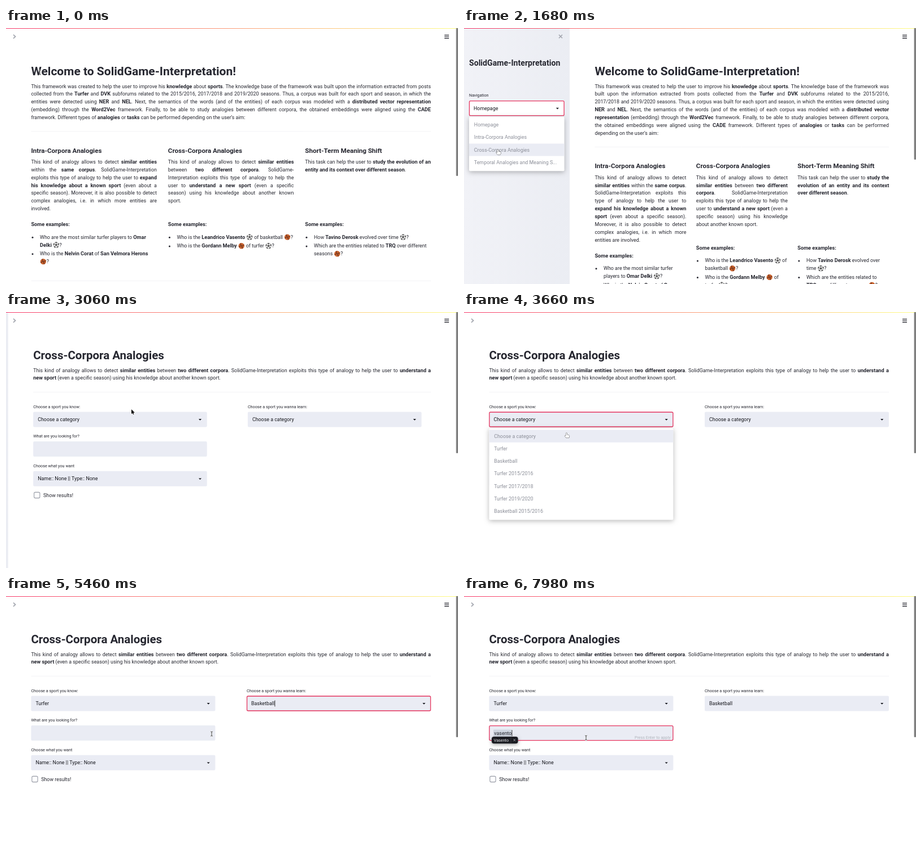
Recreate the animation shown at these times as an HTML page with a canvas. Size 800 by 455 pixels, loop 8000 ms.

```html
<!DOCTYPE html>
<html lang="en">
<head>
<meta charset="utf-8">
<title>Sport analogies demo</title>
<style>
  html, body { margin: 0; width: 100%; height: 100%; overflow: hidden; background: #fff; }
  canvas { display: block; width: 800px; height: 455px; }
</style>
</head>
<body>
<canvas id="stage"></canvas>
<script>
const LOOP = 8000, SIDEBAR = 187, LEFT = 44.4, RIGHT = 752, LINE = 13.9, BODY = 8.9, BOLD = 9.2;
const INK = '#262730', PINK = '#e6355f', FIELD = '#eaecf4', GREY = '#8b8e98';
const canvas = document.getElementById('stage');
const ctx = canvas.getContext('2d');
const ratio = window.devicePixelRatio || 1;
canvas.width = 800 * ratio;
canvas.height = 455 * ratio;

const font = (size, bold) => `${bold ? 700 : 400} ${size}px Roboto, sans-serif`;
const clamp = v => Math.min(1, Math.max(0, v));
const ramp = (t, from, span) => clamp((t - from) / span);
const during = (t, from, to) => t >= from && t < to;

// Rich text: *bold*, @ and # are balls, ~ glues to the previous word,
// |digits are the layouts that break after the word.
function parse(src) {
  let bold = false;
  return src.split(' ').map(raw => {
    const [body, breaks = ''] = raw.split('|');
    const runs = [];
    for (const part of body.replace('~', '').split(/([*@#])/)) {
      if (part === '*') bold = !bold;
      else if (part) {
        const ball = part === '@' || part === '#';
        ctx.font = font(bold ? BOLD : BODY, bold);
        runs.push({ part, bold, ball, width: ball ? 11.6 : ctx.measureText(part).width });
      }
    }
    return { runs, breaks, glued: body[0] === '~', width: runs.reduce((sum, r) => sum + r.width, 0) };
  });
}

const intro = parse('This framework was created to help the user to improve his *knowledge* about *sports*. ' +
  'The knowledge base of the framework was|2 built|1 upon the information extracted from posts|0 collected from the ' +
  '*Turfer* and *DVK* subforums related to the 2015/2016,|2 2017/2018 and|1 2019/2020 seasons. Thus, a corpus was ' +
  'built for each sport and season, in which the|0 entities were detected using|2 *NER* and *NEL*. Next,|1 the ' +
  'semantics of the words (and of the entities) of each corpus was modeled with a *distributed vector|2 ' +
  'representation*|0 (embedding)|1 through the *Word2Vec* framework. Finally, to be able to study analogies between ' +
  'different corpora,|2 the obtained embeddings were|1 aligned using the *CADE*|0 framework. Different types of ' +
  '*analogies* or *tasks* can be performed|2 depending on the user’s aim:');

const columns = [
  { title: 'Intra-Corpora Analogies', skip: 2,
    text: 'This kind of analogy allows to detect|2 *similar|1 entities*|0 within the *same corpus*.|2 SolidGame-|1 ' +
      '~Interpretation|0 exploits this|2 type of analogy to|1 help the user to|2 *expand|0 his knowledge about|1 a ' +
      'known|2 sport* (even about a|0 specific season).|12 Moreover, it is also possible to detect|02 complex|1 ' +
      'analogies, i.e. in which more|2 entities are|01 involved.',
    list: ['Who are the most similar turfer|2 players to|1 *Omar|0 Delki* @?',
      'Who is the *Nelvin Corat* of *San|2 Velmora|1 Herons*|0 #?'] },
  { title: 'Cross-Corpora Analogies', skip: 3,
    text: 'This kind of analogy allows to detect|2 *similar|1 entities*|0 between *two different|2 corpora*.|1 ' +
      'SolidGame-|0 ~Interpretation|2 exploits this type of|1 analogy to help the|02 user to *understand a new|1 ' +
      'sport* (even a|2 specific|0 season) using his|1 knowledge|2 about another known|0 sport.',
    list: ['Who is the *Leandrico Vasento* @ of|12 basketball #?',
      'Who is the *Gordann Melby* # of|2 turfer|1 @?'] },
  { title: 'Short-Term Meaning Shift', skip: 7,
    text: 'This task can help the user to *study the|12 evolution of an|0 entity and its context|2 over|1 different season*.',
    list: ['How *Tavino Derosk* evolved over|2 time|1 @?',
      'Which are the entities related to|2 *TRQ* over|1 different|0 seasons #?'] }
].map(c => ({ ...c, text: parse(c.text), list: c.list.map(parse) }));

const crossIntro = parse('This kind of analogy allows to detect *similar entities* between *two different corpora*. ' +
  'SolidGame- ~Interpretation exploits this type of analogy to help the user to *understand a|0 new sport* (even a ' +
  'specific season) using his knowledge about another known sport.');

const pages = ['Homepage', 'Intra-Corpora Analogies', 'Cross-Corpora Analogies', 'Temporal Analogies and Meaning S...'];
const none = 'Choose a category';
const sports = [none, 'Turfer', 'Basketball', 'Turfer 2015/2016', 'Turfer 2017/2018', 'Turfer 2019/2020', 'Basketball 2015/2016'];
const otherSports = sports.filter(s => s !== 'Turfer');

function text(s, x, mid, size = BODY, bold = false, color = INK) {
  ctx.font = font(size, bold);
  ctx.fillStyle = color;
  ctx.fillText(s, x, mid + size * 0.34);
}

function box(x, y, w, h, fill, radius = 2) {
  ctx.beginPath();
  ctx.roundRect(x, y, w, h, radius);
  ctx.fillStyle = fill;
  ctx.fill();
}

function stroke(color, width, ...lines) {
  ctx.beginPath();
  for (const pts of lines) pts.forEach(([x, y], i) => i ? ctx.lineTo(x, y) : ctx.moveTo(x, y));
  ctx.strokeStyle = color;
  ctx.lineWidth = width;
  ctx.stroke();
}

function disc(x, y, r, fill) {
  ctx.beginPath();
  ctx.arc(x, y, r, 0, 2 * Math.PI);
  ctx.fillStyle = fill;
  ctx.fill();
}

function drawBall(x, y, basket) {
  ctx.save();
  disc(x, y, 5.2, basket ? '#c9632f' : '#e4e4e4');
  ctx.clip();
  if (basket) {
    stroke('#56291a', 0.7, [[x - 5, y + 2], [x + 5, y - 2]], [[x - 2, y - 5], [x + 2, y + 5]]);
    for (const side of [-1, 1]) {
      ctx.beginPath();
      ctx.arc(x + side * 5.5, y + side * 2.5, 4.2, 0, 2 * Math.PI);
      ctx.stroke();
    }
  } else {
    disc(x, y, 1.8, '#333');
    for (let i = 0; i < 5; i++) {
      const a = i * 2 * Math.PI / 5 - Math.PI / 2;
      const px = x + 5 * Math.cos(a), py = y + 5 * Math.sin(a);
      stroke('#888', 0.5, [[x, y], [px, py]]);
      disc(px, py, 1.6, '#333');
    }
    ctx.beginPath();
    ctx.arc(x, y, 5, 0, 2 * Math.PI);
    ctx.strokeStyle = '#777';
    ctx.lineWidth = 0.6;
    ctx.stroke();
  }
  ctx.restore();
}

function wrap(words, width, layout) {
  const lines = [[]];
  let used = 0, broke = false;
  for (const word of words) {
    const gap = word.glued ? 0 : 2.2;
    if (broke || (layout < 0 && used && used + gap + word.width > width)) {
      lines.push([]);
      used = 0;
    }
    lines[lines.length - 1].push(word);
    used += word.width + (used ? gap : 0);
    broke = layout >= 0 && word.breaks.includes(layout);
  }
  return lines;
}

// Returns the middle of the last line.
function paragraph(words, x, y, width, layout, justify = true) {
  const lines = wrap(words, width, layout);
  lines.forEach((line, row) => {
    const mid = y + row * LINE;
    const gaps = line.filter((w, i) => i && !w.glued).length;
    const filled = line.reduce((sum, w) => sum + w.width, 0);
    const space = justify && gaps && row < lines.length - 1 ? (width - filled) / gaps : 2.2;
    let pen = x;
    line.forEach((word, i) => {
      if (i && !word.glued) pen += space;
      for (const run of word.runs) {
        if (run.ball) drawBall(pen + 5.8, mid, run.part === '#');
        else {
          ctx.font = font(run.bold ? BOLD : BODY, run.bold);
          ctx.fillStyle = INK;
          ctx.fillText(run.part, pen, mid + BODY * 0.34);
        }
        pen += run.width;
      }
    });
  });
  return y + (lines.length - 1) * LINE;
}

const rule = (x, y) => stroke('#eeeef2', 0.7, [[x, y], [RIGHT, y]]);

// The standard CSS "ease" curve.
function ease(p) {
  let lo = 0, hi = 1;
  for (let i = 0; i < 20; i++) {
    const u = (lo + hi) / 2;
    if (0.75 * u * (1 - u) + u ** 3 < p) lo = u; else hi = u;
  }
  return 0.3 * lo * (1 - lo) ** 2 + 3 * lo * lo * (1 - lo) + lo ** 3;
}

function sidebarEdge(t) {
  const opening = t < 2000;
  const p = ramp(t, opening ? 530 : 2816, 300);
  const moved = p === 0 || p === 1 ? p : ease(p);
  return SIDEBAR * (opening ? moved : 1 - moved);
}

function drawHome(edge, lagged) {
  const x = LEFT + edge, width = RIGHT - x;
  const layout = edge === 0 ? 0 : edge === SIDEBAR ? 2 : edge > 150 ? 1 : -1;
  text('Welcome to SolidGame-Interpretation!', x, 77, 21, true);
  const ruleY = paragraph(intro, x, 103.5, width, layout) + 24.7;
  rule(x, ruleY);
  const colWidth = 0.3235 * (RIGHT - LEFT - lagged) - 6.4, pitch = 0.337 * width + 4;
  let bottom = 0;
  columns.forEach((col, i) => {
    const cx = x + i * pitch;
    text(col.title, cx, ruleY + 33.8, 11.6, true);
    let y = paragraph(col.text, cx, ruleY + 54, colWidth, layout) + col.skip * LINE;
    text('Some examples:', cx, y, BOLD, true);
    y += 22.6;
    for (const item of col.list) {
      disc(cx + 2.6, y + 0.6, 1.5, INK);
      y = paragraph(item, cx + 15.7, y, colWidth - 15.7, layout, false) + 15.7;
    }
    bottom = Math.max(bottom, y);
  });
  rule(x, bottom + 18.6);
}

function select(x, y, w, value, focused, fill = FIELD) {
  box(x, y, w, 27, fill);
  if (focused) {
    ctx.beginPath();
    ctx.roundRect(x + 0.5, y + 0.5, w - 1, 26, 2);
    ctx.strokeStyle = PINK;
    ctx.lineWidth = 1.3;
    ctx.stroke();
  }
  if (value === null) return;
  text(value, x + 8, y + 13.5, BODY, false, '#15161c');
  const ax = x + w - 12.2, ay = y + 12.6;
  ctx.beginPath();
  ctx.moveTo(ax - 2.6, ay);
  ctx.lineTo(ax + 2.6, ay);
  ctx.lineTo(ax, ay + 2.7);
  ctx.fill();
}

function popup(x, y, w, items, mouse, maxHeight = 300) {
  const row = 22.2, h = Math.min(maxHeight, items.length * row + 7.6);
  ctx.save();
  ctx.shadowColor = 'rgba(0,0,0,.28)';
  ctx.shadowBlur = 9 * ratio;
  ctx.shadowOffsetY = 2.2 * ratio;
  box(x, y, w, h, '#fff');
  ctx.restore();
  ctx.save();
  ctx.beginPath();
  ctx.rect(x, y, w, h);
  ctx.clip();
  items.forEach((item, i) => {
    const top = y + 3.2 + i * row;
    if (mouse.y >= top && mouse.y < top + row) box(x, top, w, row, FIELD, 0);
    text(item, x + 8.8, top + row / 2, BODY, false, GREY);
  });
  ctx.restore();
}

const caret = (x, y) => stroke('#222', 0.9, [[x, y - 5.5], [x, y + 5.5]]);
const blink = t => t % 1060 < 600;

function textWidth(s) {
  ctx.font = font(BODY);
  return ctx.measureText(s).width;
}

function drawInput(x, y, w, t) {
  const focused = t >= 5720;
  select(x, y, w, null, focused);
  if (!focused) return;
  const word = 'vasento'.slice(0, Math.max(0, Math.floor((t - 6300) / 110) + 1));
  const end = x + 8.9 + textWidth(word), mid = y + 13.5;
  const hint = ramp(t, 6980, 140);
  if (hint) {
    ctx.globalAlpha = hint;
    box(x + 7.6, mid - 6.2, end - x - 7.6, 12.5, '#cfd6e0', 1);
    ctx.globalAlpha = 1;
  }
  text(word, x + 8.9, mid);
  if (blink(t) || during(t, 6300, 7000)) caret(end + 0.5, mid);
  if (word) text('Press Enter to apply', x + w - 68.5, y + 21.4, 7.2, false, '#b0b3bc');
  if (hint) {
    ctx.save();
    ctx.globalAlpha = hint;
    ctx.shadowColor = 'rgba(0,0,0,.35)';
    ctx.shadowBlur = 6 * ratio;
    ctx.shadowOffsetY = 2 * ratio;
    box(x + 4.6, y + 19.8, 46.6, 12.4, '#1b1c22', 4);
    ctx.shadowColor = 'transparent';
    text('Vasento', x + 8.4, y + 26, 7.2, false, '#e6e6ea');
    stroke('#444650', 0.6, [[x + 38.6, y + 20.5], [x + 38.6, y + 31.5]]);
    stroke('#b8b9c0', 0.8, [[x + 43, y + 24.2], [x + 46.6, y + 27.8]], [[x + 46.6, y + 24.2], [x + 43, y + 27.8]]);
    ctx.restore();
  }
}

function drawCross(t, edge, lagged, mouse) {
  const x = LEFT + edge, width = RIGHT - x;
  text('Cross-Corpora Analogies', x, 77, 20.5, true);
  const y = paragraph(crossIntro, x, 103.5, width, width > 690 ? 0 : -1) + 25;
  rule(x, y);
  if (t < 2900) return;

  const w = (RIGHT - LEFT - lagged - 55.6) / 2, right = x + (width + 55.6) / 2;
  const label = (s, lx, ly) => text(s, lx, ly, 7.25);
  label('Choose a sport you know:', x, y + 25.8);
  select(x, y + 35.1, w, t < 4060 ? none : 'Turfer', during(t, 3480, 4800));
  label('Choose a sport you wanna learn:', right, y + 25.8);
  const learned = t >= 5160;
  select(right, y + 35.1, w, learned ? 'Basketball' : none, during(t, 4800, 5720));
  if (learned && t < 5720 && blink(t)) caret(right + 8.8 + textWidth('Basketball'), y + 48.6);
  label('What are you looking for?', x, y + 78.4);
  label('Choose what you want', x, y + 131.2);
  drawInput(x, y + 87.7, w, t);
  select(x, y + 140.4, w, 'Name:: None || Type:: None', false);
  ctx.beginPath();
  ctx.roundRect(x + 1.5, y + 178, 10.2, 10.2, 2);
  ctx.strokeStyle = '#969aa5';
  ctx.lineWidth = 1.1;
  ctx.stroke();
  text('Show results!', x + 17.8, y + 183.3);
  if (during(t, 3480, 4060)) popup(x, y + 64, w, sports, mouse, 166.7);
  if (during(t, 4800, 5160)) popup(right, y + 64, w, otherSports, mouse);
}

function drawSidebar(t, edge, mouse) {
  if (edge <= 0) return;
  ctx.save();
  ctx.translate(edge - SIDEBAR, 0);
  const shade = ctx.createLinearGradient(0, 0, SIDEBAR, 0);
  shade.addColorStop(0, '#f1f2f7');
  shade.addColorStop(1, '#ebedf3');
  box(0, 0, SIDEBAR, 455, shade, 0);
  stroke('#a3a6af', 1.7, [[168, 12], [174, 18]], [[174, 12], [168, 18]]);
  text('SolidGame-Interpretation', 9, 62, 14.1, true);
  text('Navigation', 9, 119.7, 7.25);
  const chosen = t >= 1760;
  select(9, 129.2, 168.6, pages[chosen ? 2 : 0], during(t, 1060, 2816), '#fff');
  if (t >= 1060 && !chosen) popup(9, 157.8, 168.6, pages, mouse);
  ctx.restore();
}

function drawStatus(t) {
  const pulse = (from, to) => Math.min(ramp(t, from, 200), 1 - ramp(t, to, 120));
  const alpha = 0.8 * Math.max(pulse(2240, 2760), pulse(4545, 4860), pulse(5640, 5900));
  if (alpha <= 0) return;
  ctx.save();
  ctx.globalAlpha = alpha;
  stroke(GREY, 1, [[669, 11], [678, 17]], [[678, 11], [669, 17]], [[668, 19.3], [679, 19.3]]);
  text('Running...', 685, 15.3, 7.4, false, GREY);
  text('Stop', 739, 15, 7.4, false, GREY);
  ctx.restore();
}

function drawChrome(edge, lagged, home) {
  if (edge < 20) stroke('#a3a6af', 1.7, [[13, 11.8], [16.6, 15.2], [13, 18.6]]);
  stroke('#22232b', 1.2, ...[12.6, 15.5, 18.4].map(y => [[776, y], [784, y]]));
  const bar = ctx.createLinearGradient(0, 0, 800, 0);
  bar.addColorStop(0, '#f63366');
  bar.addColorStop(1, '#fffd80');
  box(0, 0, 800, 1.1, bar, 0);
  box(796.6, 0, 3.4, home ? 263 - 29 * edge / SIDEBAR : 251, '#7f7f7f', 1.5);
  if (home && edge - lagged > 15) box(edge, 451.5, 782 - edge, 3.5, '#7f7f7f', 1.5);
}

const route = [
  [0, 60, 79, 'beam'], [60, 60, 79, 'beam'], [200, 40, 45, 'arrow'], [440, 15, 16, 'hand'], [540, 15, 16, 'arrow'],
  [720, 53, 72, 'arrow'], [1000, 75, 142, 'hand'], [1120, 75, 142, 'hand'], [1560, 60, 216, 'hand'],
  [1780, 60, 216, 'arrow'], [2640, 171, 15, 'hand'], [2810, 171, 15, 'arrow'], [3060, 222, 173, 'arrow'],
  [3240, 226, 190, 'hand'], [3480, 226, 190, 'hand'], [3860, 130, 243, 'hand'], [4220, 130, 243, 'arrow'],
  [4560, 436, 206, 'arrow'], [4760, 510, 190, 'hand'], [4840, 510, 190, 'hand'], [5040, 500, 243, 'hand'],
  [5240, 500, 243, 'arrow'], [5401, 500, 243, 'arrow'], [5460, 364, 245, 'beam'], [5680, 240, 246, 'beam'],
  [6120, 216, 252, 'beam'], [LOOP, 216, 252, 'beam']
];

function mouseAt(t) {
  const i = Math.max(1, route.findIndex(k => k[0] > t));
  const [t0, x0, y0, kind] = route[i - 1], [t1, x1, y1] = route[i];
  const p = ramp(t, t0, t1 - t0), s = p * p * (3 - 2 * p);
  return { x: x0 + (x1 - x0) * s, y: y0 + (y1 - y0) * s, kind };
}

const shapes = {
  arrow: new Path2D('M0 0V8.2L1.9 6.5 3.1 9.3 4.4 8.7 3.2 6H5.8Z'),
  hand: new Path2D('M-1 0.6Q0 -0.7 1 0.6V3.6L4.2 4.2Q5.4 4.6 5.2 5.8L4.4 9H-0.6L-3.2 5.6Q-3 4.2 -1 5.6Z'),
  beam: new Path2D('M-1.8 -4Q0 -4 0 -3V3Q0 4 -1.8 4M1.8 -4Q0 -4 0 -3M0 3Q0 4 1.8 4')
};

function drawMouse({ x, y, kind }) {
  ctx.save();
  ctx.translate(x, y);
  ctx.strokeStyle = kind === 'hand' ? '#222' : '#fff';
  ctx.lineWidth = kind === 'hand' ? 0.8 : kind === 'arrow' ? 1.2 : 2;
  ctx.stroke(shapes[kind]);
  if (kind === 'beam') {
    ctx.strokeStyle = '#222';
    ctx.lineWidth = 0.9;
    ctx.stroke(shapes[kind]);
  } else {
    ctx.fillStyle = kind === 'hand' ? '#fff' : '#000';
    ctx.fill(shapes[kind]);
  }
  ctx.restore();
}

function draw(now) {
  const t = now % LOOP, home = t < 1900;
  const edge = sidebarEdge(t), lagged = sidebarEdge(t < 95 ? 0 : t - 95), mouse = mouseAt(t);
  ctx.setTransform(ratio, 0, 0, ratio, 0, 0);
  ctx.fillStyle = '#fff';
  ctx.fillRect(0, 0, 800, 455);
  if (home) drawHome(edge, lagged);
  else drawCross(t, edge, lagged, mouse);
  drawSidebar(t, edge, mouse);
  drawStatus(t);
  drawChrome(edge, lagged, home);
  drawMouse(mouse);
}

const start = performance.now();
function tick() {
  draw(performance.now() - start);
  requestAnimationFrame(tick);
}
tick();
</script>
</body>
</html>
```
